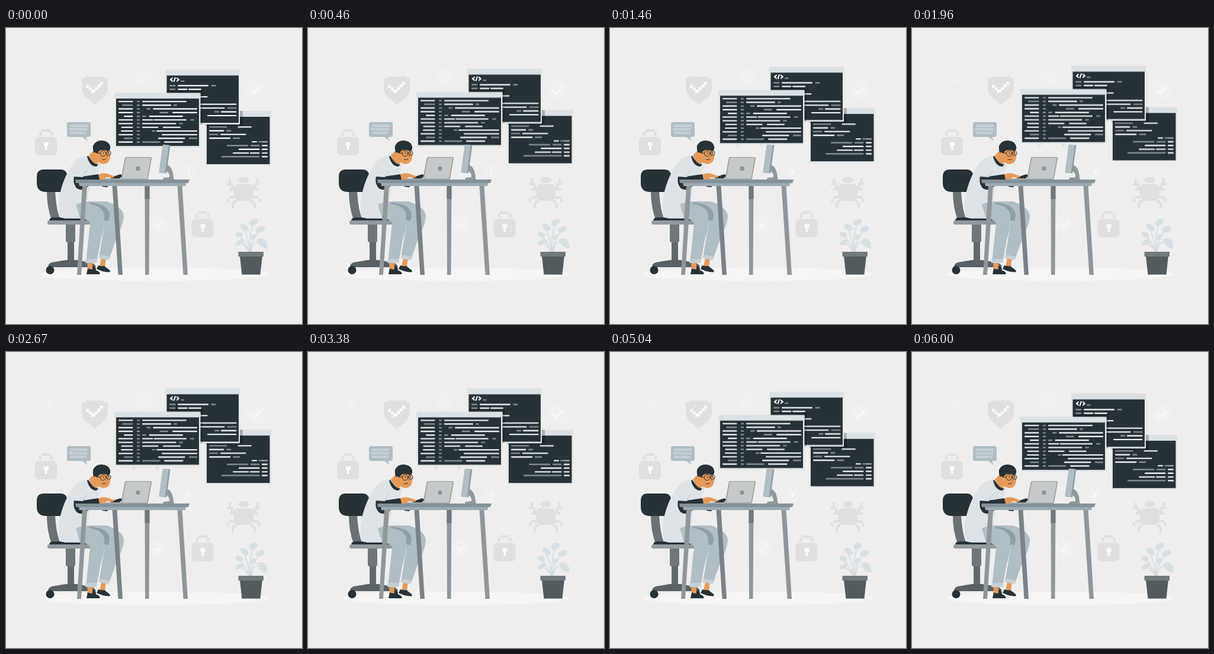
Write an HTML page that moves like this. It is 500 px wide and 500 px high and loops after 6040 ms.

```html
<!DOCTYPE html>
<html lang="en">
<head>
<meta charset="utf-8">
<title>Programmer at work</title>
<style>
  html, body { margin: 0; width: 100%; height: 100%; overflow: hidden; background: #eee; }
  svg { display: block; width: 100%; height: 100%; }
  .float { animation: float 6.04s linear infinite; }
  @keyframes float { 50% { transform: translateY(-10px); } }
  .pale { fill: #e0e0e0; }
  .glow { fill: #f0f0f0; }
  .tick { fill: none; stroke: #fafafa; stroke-width: 2; }
  .frame { fill: #dbe1e4; }
  .edge { fill: #e3e6e8; }
  .ink { fill: #263238; }
  .skin { fill: #e79a58; }
  .w, .g { fill: none; stroke-width: 2.1; stroke-linecap: round; }
  .w { stroke: #fff; }
  .g { stroke: #8f989c; }
  .bits { font: 5.6px "Liberation Sans", Arial, sans-serif; fill: #f4f7f8; }
</style>
</head>
<body>
<svg viewBox="0 0 500 500">
  <defs>
    <g id="lock">
      <path class="pale" d="M3 13H34V16H37V41H34V44H3V41H0V16H3Z"/>
      <path class="pale" d="M7 11V4H11V0H26V4H30V11H26V4.500H11V11Z"/>
      <path d="M15 22H23V28H20.500V35H17V28H15Z" fill="#fafafa"/>
    </g>
    <clipPath id="backPane"><rect x="336.500" y="140" width="111.500" height="92.500"/></clipPath>
    <clipPath id="midPane"><rect x="269" y="70.500" width="126" height="92.500"/></clipPath>
  </defs>

  <!-- Backdrop icons -->
  <g class="glow">
    <circle cx="73" cy="88" r="7"/><circle cx="231" cy="83" r="14"/>
    <circle cx="422" cy="105" r="16"/><circle cx="258" cy="332" r="15"/>
    <circle cx="309" cy="242" r="12"/>
  </g>
  <path d="M134 82H166V85H172V107H170V113H167V117H163V121H158V125H153V129H147V125H142V121H137V117H133V113H130V107H128V85H134Z" class="pale"/>
  <path d="M135.500 96H140V100.500H144.500V104H150V100H154.500V95.500H159V91H164V95.500H160V100H155.500V104.500H151V109H146V110.500H144V105H140V101H135.500Z" fill="#fafafa"/>
  <path class="tick" d="M413 105L419 110.500L430 99"/>
  <path class="tick" stroke-width="1.500" d="M251 332L256 336L264 328"/>
  <path d="M307 239H311V242H310V245H308V242H307Z" fill="#fafafa"/>
  <use href="#lock" x="49" y="171"/>
  <use href="#lock" x="313.500" y="309.500"/>
  <path d="M214 188h4v12h-4zM253 188h4v12h-4z" fill="#e3e3e3"/>
  <g class="pale">
    <path d="M395 252H408V255H411V259H408V262H395V259H392V255H395ZM388 264H415V268H418V288H415V292H388V288H385V268H388Z"/>
    <path d="M376 254h4v8h4v5h4v4h-8v-5h-4zM427 254h-4v8h-4v5h-4v4h8v-5h4zM373 262h4v4h-4zM426 262h4v4h-4zM377 271h9v4h-9zM418 271h9v4h-9zM373 288h4v6h-4zM426 288h4v6h-4zM377 284h9v4h-9zM418 284h9v4h-9zM384 291h5v5h-4v9h-4v-10h3zM419 291h-5v5h4v9h4v-10h-3z"/>
  </g>
  <ellipse cx="250" cy="416" rx="193" ry="11.500" fill="#f5f5f5"/>

  <!-- Floating code windows -->
  <g class="float">
    <g id="back">
      <rect class="edge" x="336.500" y="140" width="111.500" height="92.500" rx="1"/>
      <rect class="frame" x="336.500" y="140" width="111.500" height="10"/>
      <rect class="ink" x="339" y="150" width="106.500" height="80"/>
      <path class="w" d="M392.500 167.200h21.500M344 173.600h23.500M363 179.800h41.500M344 186.100h34.500M416 192.300h7M433 192.300h8M394 204.900h33.500M433 198.600h8M433 204.900h8M384 211.200h25.500M413 211.200h14.500M433 211.200h8M433 217.400h8"/>
      <path class="g" d="M344 167.200h28.500M373 173.600h6.500M344 179.800h13.500M384 186.100h10.500M427 192.300h14M374 198.600h34.500M414 198.600h13.500M365 217.400h62.500"/>
      <rect x="330" y="135" width="70" height="30" opacity=".22" clip-path="url(#backPane)"/>
    </g>
    <g id="middle">
      <rect class="edge" x="269" y="70.500" width="126" height="92.500" rx="1"/>
      <rect class="frame" x="269" y="70.500" width="126" height="9.750"/>
      <rect class="ink" x="271.500" y="80.250" width="121.500" height="80"/>
      <path class="w" stroke-width="1.500" d="M281 84.700L278 87.200L281 89.700M285.800 84L283.800 90.300M288.800 84.700L291.800 87.200L288.800 89.700"/>
      <path class="w" d="M291 97.400h50M291 103.600h14.500M309 103.600h20M320 116.200h19.500M320 128.800h68.500M320 135.200h48.500M364 141.600h24.500M341 148h47.500"/>
      <path class="g" d="M296 89.700h4.500M277 97.400h8.500M347.500 97.400h6M277 103.600h8.500M374.500 135.200h14M353 141.600h6.500"/>
      <rect x="272" y="105" width="60" height="99" opacity=".2" clip-path="url(#midPane)"/>
    </g>
    <g id="front">
      <rect class="edge" x="183.500" y="109.700" width="145" height="92" rx="1"/>
      <rect class="frame" x="183.500" y="109.700" width="145" height="9.500"/>
      <rect class="ink" x="186" y="119.200" width="140" height="80"/>
      <path d="M223.500 123.200V194" stroke="#8f989c" stroke-width="5" stroke-dasharray="2.100 4.120"/>
      <path class="w" d="M191 124.200h22.500M191 136.600h22.500M191 142.900h22.500M200 149.100h13.500M191 155.300h22.500M191 161.500h22.500M195.500 167.700h18M195 174h18.500M191 180.200h22.500M191 192.600h22.500"/>
      <path class="g" d="M197 130.400h16.500M200 186.400h13.500"/>
      <path class="w" d="M231 124.200h73M231 130.400h47M249 136.600h73M282 142.900h40M242.500 149.100h55.500M231 155.300h16.500M250.500 155.300h53.500M231 161.500h55.500M231 167.700h25.500M266 167.700h28M255 174h67M264 180.200h58M258 186.400h43.500M268 192.600h30.500"/>
      <path class="g" d="M284 130.400h4M238 136.600h5.500M260.500 142.900h12.500M231 149.100h5M312 155.300h5M293 161.500h5M247 174h4.500M310 186.400h12M231 192.600h28.500"/>
    </g>
  </g>

  <!-- Speech bubble -->
  <path d="M106 159H140Q143 159 143 162V181Q143 184 140 184H135L138 191L129 184H106Q103 184 103 181V162Q103 159 106 159Z" fill="#b0bec5"/>
  <g class="bits">
    <text x="107.500" y="167.300">1001101001</text>
    <text x="106.500" y="173.300">0010100110</text>
    <text x="108" y="179.300">100110101</text>
  </g>

  <!-- Chair -->
  <path d="M69 276H83Q85 307 91 321L77 324Q69 302 69 276Z" fill="#6b7275"/>
  <path class="ink" d="M64 239H92Q103 239 104 252L106 277H68Q52 277 52 262V251Q52 239 64 239ZM73 325Q74 320 80 320H143V326H73Z"/>
  <path d="M104 360H115V396H104Z" fill="#60686b"/>
  <path d="M101 331H117V359Q117 362 114 362H104Q101 362 101 359Z" fill="#6f777a"/>
  <rect x="70" y="325" width="73" height="7" rx="3" fill="#929b9f"/>
  <path d="M71 402Q72 396 83 395L101 392H119L142 396Q151 398 152 404H73Z" fill="#596165"/>
  <circle class="ink" cx="74.500" cy="409" r="7"/>
  <circle class="ink" cx="146" cy="408" r="6"/>

  <!-- Person: legs -->
  <path class="skin" d="M161 388H169L167 404H158ZM137 396H146V409H138Z"/>
  <path class="ink" d="M156 401Q162 403 166 402L175 409Q177 412 174 412.500Q163 412 153 407ZM138 406Q143 409 147 407L156 411Q160 414 158 416H136Z"/>
  <path d="M122 293H170Q199 302 199 319Q197 336 189 348L174 391L157 388L166 334L164 320L125 309Z" fill="#b0bec5"/>
  <path d="M142 295Q176 298 175 318L173 326L164 324Q157 307 132 302Z" fill="#8e9fa7"/>
  <path d="M98 296H132Q166 299 166 318Q167 337 160 358L153 396H135L142 330Q140 323 124 322H99Q88 316 91 303Z" fill="#b0bec5"/>
  <path d="M135 390H154L153 397H134ZM158 383L176 386L173 392L157 389Z" fill="#c4d0d6"/>
  <!-- Person: body -->
  <path d="M139 215Q122 216 113 230Q95 254 89 291Q87 314 94 321H125L118 298Q132 292 137 294L141 268L154 247L160 232L158 222Z" fill="#dde3e6"/>
  <path class="ink" d="M139 216Q149 232 156 230L153 234Q141 234 137 217Z"/>
  <path class="skin" d="M140 215L148 207L157 224L154 230Q146 229 140 215Z"/>
  <path class="ink" d="M115 250L128 251L156 247L159 255L130 273Q120 274 117 267Q113 261 115 250ZM178 252L193 247L197 249L190 256H176ZM162 263L174 264L171 269L163 268Z"/>
  <path d="M118 234Q112 245 115 251L130 252L138 236" fill="#dde3e6"/>
  <path d="M129 251L137 240" stroke="#bfc8cc" stroke-width="1" fill="none"/>
  <path class="skin" d="M156 247Q164 244 171 246L182 250Q184 253 179 253L170 252L165 256H158Z"/>
  <!-- Person: head -->
  <path class="skin" d="M149 204L172 203Q177 211 176 219Q174 230 164 230Q153 228 149 217Z"/>
  <path class="ink" d="M150 214Q146 207 147 199Q151 190 162 190Q174 191 176 200Q177 206 173 208Q168 206 163 206Q157 206 155 211Z"/>
  <circle class="skin" cx="150.500" cy="214" r="3.700"/>
  <g fill="none" stroke="#263238" stroke-width="1">
    <circle cx="164" cy="212" r="4.700"/><circle cx="173.500" cy="211.500" r="3.700"/>
    <path d="M153 211L159.300 211.500M168.500 211L170 211M162 205.500L167 205M171 205.500L175 206M162 222Q166 224 169 221"/>
    <path d="M169.500 213L171.500 217L168.500 217.500" stroke="#b9713a" stroke-width=".8"/>
  </g>
  <circle class="ink" cx="164.500" cy="211.500" r="1"/>
  <circle class="ink" cx="173" cy="211" r="1"/>

  <!-- Monitor and laptop -->
  <path d="M272 231Q282 235 283 253L284 256H265L266 253L276 252Q277 245 270 241Z" fill="#8f999e"/>
  <path d="M265 197L277.500 198L271 245.500L258.500 244Z" fill="#8d9ca4"/>
  <path d="M265 197L275 198L268.500 245L258.500 244Z" fill="#b0bec5"/>
  <path d="M203.500 218H244Q246.500 218 246 221L240 254Q239.500 256 237 256H194L200.500 221Q201 218 203.500 218Z" fill="#979da0"/>
  <path d="M204.500 219H243Q245 219 244.500 221L238.500 253Q238 255 236 255H196L202 221.500Q202.500 219 204.500 219Z" fill="#c6c9ca"/>
  <circle cx="223" cy="237.500" r="3.700" fill="#8e9497"/>
  <path d="M166 254H239V256.500H166Z" fill="#a6adb0"/>

  <!-- Desk -->
  <path d="M129 266H137L127 417H120Z" fill="#90979b"/>
  <path d="M179.500 266H187.500L197 417H189.500Z" fill="#798387"/>
  <path d="M234.500 266H242.500L241.500 417H235Z" fill="#90979b"/>
  <path d="M234.500 266H242.500V289H234.500Z" fill="#70797d"/>
  <path d="M289.500 266H297.500L307 417H299.500Z" fill="#90979b"/>
  <path d="M123 261H304.500L303 267H124Z" fill="#9cabb3"/>
  <path d="M117 256H310L308 262H118Z" fill="#83929a"/>

  <!-- Plant -->
  <g fill="none" stroke="#cfd9de" stroke-width="1.300">
    <path d="M413 379Q409 356 418 329M412 379Q409 353 401 338M413 379Q415 355 430 341M411 379Q406 361 393 350M411 379Q404 364 393 363M415 379Q415 355 435 365"/>
  </g>
  <g fill="#d7e0e4">
    <ellipse cx="418" cy="328" rx="8" ry="5" transform="rotate(-28 418 328)"/>
    <ellipse cx="403" cy="337" rx="8" ry="5" transform="rotate(38 403 337)"/>
    <ellipse cx="430" cy="340" rx="8" ry="5" transform="rotate(-24 430 340)"/>
    <ellipse cx="394" cy="349" rx="6.500" ry="4.300" transform="rotate(15 394 349)"/>
    <ellipse cx="395" cy="362" rx="8" ry="4" transform="rotate(-28 395 362)"/>
    <ellipse cx="418" cy="353" rx="5.500" ry="3.800" transform="rotate(-40 418 353)"/>
    <path d="M424 357Q437 352 441 364L441 373Q429 371 425 361Z"/>
  </g>
  <path d="M395 385H433L429.500 416.500H398.500Z" fill="#535b5f"/>
  <rect x="392.500" y="378" width="42.500" height="8" fill="#71797d"/>
</svg>
</body>
</html>
```
